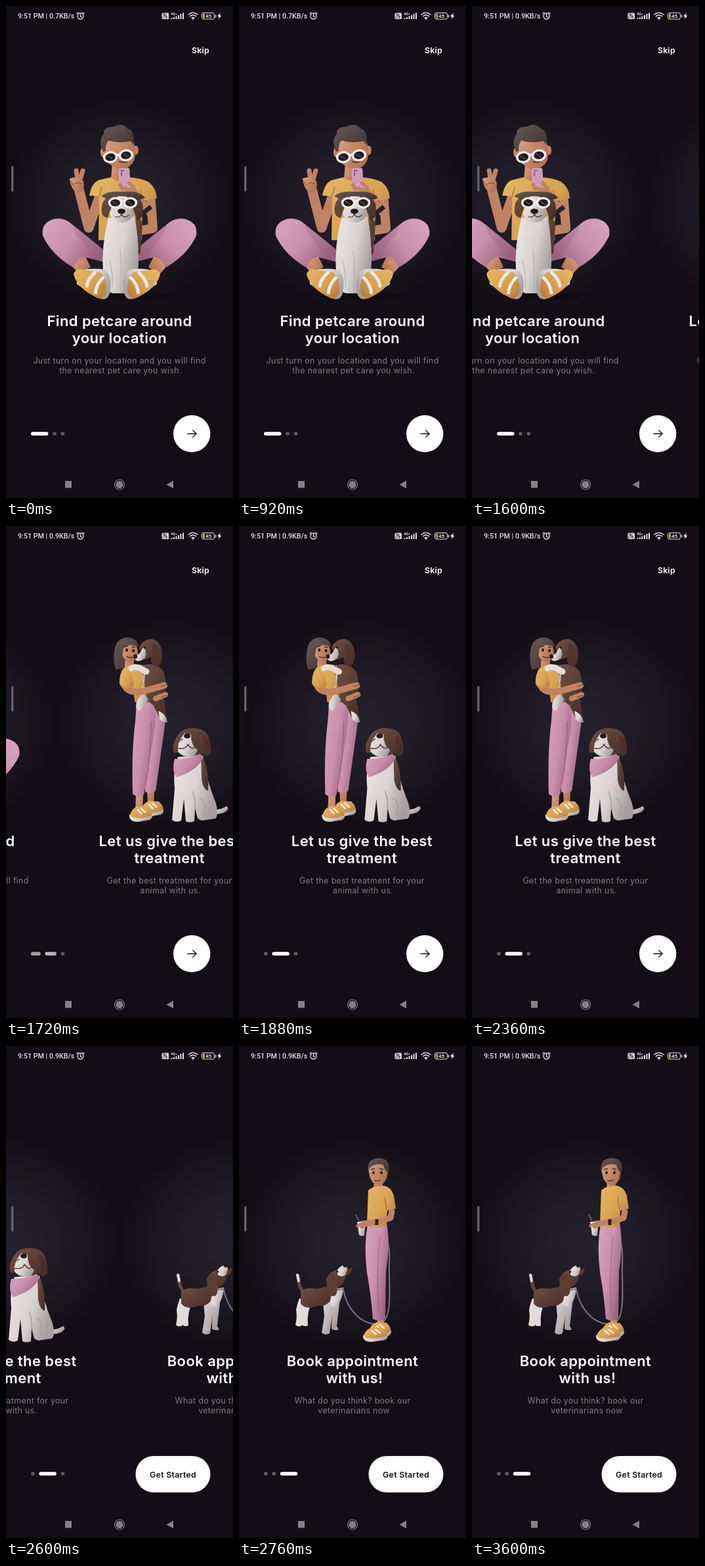
An HTML page for the animation above (4000 ms loop, 346 px wide and 750 px high).

```html
<!DOCTYPE html>
<html lang="en">
<head>
<meta charset="utf-8">
<title>Pet care onboarding</title>
<style>
html, body { margin: 0; width: 100%; height: 100%; overflow: hidden; background: #130e15; }
svg { display: block; width: 346px; height: 750px; }
text { font-family: Inter, sans-serif; fill: #fff; }
.title { font-size: 22px; font-weight: 600; letter-spacing: .42px; text-anchor: middle; }
.sub { font-size: 12.5px; letter-spacing: .28px; text-anchor: middle; fill: #7f7b82; }
.label { font-size: 12.4px; font-weight: 600; letter-spacing: .25px; }
.status { font: 500 10.7px Roboto, sans-serif; fill: #e4e2e5; }
.sk { fill: url(#skin); } .pk { fill: url(#pink); } .ye { fill: url(#yellow); }
.wh { fill: url(#white); } .br { fill: url(#brown); } .hair { fill: url(#hair); }
.bk { fill: #211b20; }
.arm { fill: none; stroke: #c08264; stroke-linecap: round; stroke-linejoin: round; }
.line { fill: none; stroke: #4b3430; stroke-linecap: round; }
.ink { fill: none; stroke: #e4e2e5; }
.nav { fill: #858188; }
</style>
</head>
<body>
<svg viewBox="0 0 346 750">
<defs>
  <radialGradient id="glow">
    <stop offset="0" stop-color="#25212d"/><stop offset=".5" stop-color="#1f1b26"/>
    <stop offset="1" stop-color="#130e15"/>
  </radialGradient>
  <linearGradient id="skin" x2="1" y2=".6"><stop stop-color="#dba284"/><stop offset="1" stop-color="#b2704f"/></linearGradient>
  <linearGradient id="pink" x2="1" y2=".6"><stop stop-color="#d9a5bf"/><stop offset=".55" stop-color="#c98fac"/><stop offset="1" stop-color="#9c6381"/></linearGradient>
  <linearGradient id="yellow" x2="1" y2=".8"><stop stop-color="#e6b765"/><stop offset=".6" stop-color="#d8a252"/><stop offset="1" stop-color="#b7803c"/></linearGradient>
  <linearGradient id="white" x2="1" y2=".5"><stop stop-color="#ece8e6"/><stop offset=".6" stop-color="#d8d2d1"/><stop offset="1" stop-color="#a79fa1"/></linearGradient>
  <linearGradient id="brown" x2="1" y2="1"><stop stop-color="#735143"/><stop offset="1" stop-color="#432d27"/></linearGradient>
  <linearGradient id="hair" x2="1" y2="1"><stop stop-color="#6a5a55"/><stop offset="1" stop-color="#3b3030"/></linearGradient>
  <ellipse id="light" cx="173" cy="300" rx="172" ry="160" fill="url(#glow)"/>
  <g id="leg">
    <path class="pk" d="M56 350Q53 331 72 325Q88 321 101 333L148 371V390L121 383Q107 389 103 399Q69 379 56 350Z"/>
    <path d="M106 349Q120 360 127 381L148 390V371L101 333Z" fill="#8a5573" opacity=".25"/>
    <path class="sk" d="M103 399Q107 385 121 382L129 398L112 409Z"/>
  </g>
  <g id="sandal">
    <path class="wh" d="M108 405Q130 398 150 402Q163 410 158 438Q154 450 143 446L108 424Z"/>
    <path class="ye" d="M103 409Q106 399 118 402L143 406Q155 415 153 436Q149 449 139 445Q108 430 103 409Z"/>
    <path d="M123 429Q123 417 137 405M136 439Q137 424 149 413" fill="none" stroke="#ebe6e2" stroke-width="5"/>
  </g>
  <g id="shades">
    <path d="M-23-2L23-2" stroke="#e9e5e4" stroke-width="4"/>
    <g fill="#211b20" stroke="#f0edeb" stroke-width="3.4"><ellipse cx="-12" rx="9.5" ry="7.5"/><ellipse cx="12" rx="9.5" ry="7.5"/></g>
    <path d="M-17-3L-9 3M7-3L15 3" stroke="#5b5158" stroke-width="1.4"/>
  </g>
  <g id="shoe">
    <path class="wh" d="M0 13Q-1 24 13 24L31 21Q37 17 34 11Z"/>
    <path class="ye" d="M1 13Q4 3 13 0L28 1Q36 9 34 14Q18 20 10 18Q3 18 1 13Z"/>
    <path d="M12 5L19 12M17 3L25 10" stroke="#f3ece0" stroke-width="2.5"/>
  </g>
</defs>

<g class="page">
  <use href="#light"/>
  <ellipse cx="186" cy="442" rx="62" ry="6" fill="#0b080d" opacity=".6"/>
  <use href="#leg"/><use href="#leg" transform="matrix(-1 0 0 1 346 0)"/>
  <path class="arm" stroke-width="15" d="M111 279L126 338L142 292"/>
  <path class="arm" stroke-width="14" d="M220 286L224 339L206 342"/>
  <path class="sk" d="M162 240H183V264Q172 275 160 264Z"/>
  <path class="ye" d="M160 261Q172 272 184 261Q205 262 217 268Q229 277 230 293L208 298L207 357H141L142 290L127 289Q131 268 143 265Z"/>
  <path d="M142 290L146 276M207 298L205 280" stroke="#a87330" stroke-width="1.4"/>
  <path class="arm" stroke-width="7" d="M110 270L107 251M112 268L117 251"/>
  <path class="sk" d="M97 263Q108 258 118 267Q121 282 110 285Q99 281 97 263Z"/>
  <path class="line" d="M104 272Q109 267 115 271M99 267L103 275" stroke-width=".8"/>
  <ellipse class="sk" cx="149" cy="223" rx="5" ry="8"/><ellipse class="sk" cx="198" cy="220" rx="4" ry="7"/>
  <path class="sk" d="M151 209Q153 197 174 199L193 203Q199 217 196 234Q190 248 175 249Q156 246 151 227Z"/>
  <path class="hair" d="M148 222Q140 205 149 195Q148 184 164 184Q176 177 186 187Q197 190 194 212L190 206Q172 210 156 205Q151 212 152 221Z"/>
  <path class="line" d="M173 237Q182 241 187 234" stroke-width="1.7"/>
  <use href="#shades" transform="translate(171 229) rotate(-7)"/>
  <path class="arm" stroke-width="11" d="M222 319L190 277"/>
  <path d="M211 314L221 306" stroke="#292228" stroke-width="7"/>
  <rect x="172" y="247" width="17" height="33" rx="3" fill="#cf9cb8" transform="rotate(-3 180 262)"/>
  <path d="M175 251H180M176 253V259" stroke="#8b5c7a" stroke-width="2"/>
  <path class="arm" stroke-width="6" d="M188 270L195 277M182 278L191 282M174 273L177 279"/>
  <path class="br" d="M198 318L208 330L205 376L193 390Z"/>
  <path class="wh" d="M156 323Q145 365 148 409Q148 434 163 438H187Q201 430 202 388Q202 350 196 321Z"/>
  <path d="M174 371Q177 405 175 434M158 388Q164 413 162 429" fill="none" stroke="#a9a1a3" stroke-width="1.3" opacity=".65"/>
  <path class="br" d="M147 301Q142 321 155 323L163 299L190 298L200 327Q212 324 208 301Q199 283 176 286Q154 284 147 301Z"/>
  <path class="wh" d="M170 290H184L195 315Q192 329 177 330Q160 329 158 315Z"/>
  <path class="hair" d="M145 290Q155 281 176 283Q203 281 212 292Q204 298 193 293Q174 286 154 294Z"/>
  <use href="#shades" transform="translate(178 300) scale(.95)"/>
  <ellipse class="bk" cx="176" cy="313" rx="6" ry="4"/>
  <path class="line" d="M167 321Q174 324 176 317Q179 325 187 319" stroke-width="1.3"/>
  <use href="#sandal"/><use href="#sandal" transform="matrix(-1 0 0 1 338 0)"/>
  <text class="title" x="173" y="488">Find petcare around</text>
  <text class="title" x="173" y="514">your location</text>
  <text class="sub" x="173" y="545">Just turn on your location and you will find</text>
  <text class="sub" x="174.500" y="560">the nearest pet care you wish.</text>
</g>

<g class="page">
  <use href="#light"/>
  <path class="hair" d="M91 219Q86 203 90 185Q94 170 110 170Q123 171 126 183L107 188L103 217Z"/>
  <path class="sk" d="M106 198H119V218H104Z"/>
  <path class="sk" d="M99 188Q102 177 115 178Q125 181 125 194Q122 207 112 208Q101 204 99 188Z"/>
  <path class="hair" d="M98 192Q96 174 109 173Q122 172 125 184Q110 178 103 187L101 199Z"/>
  <path d="M104 184L110 183M116 184L121 185" stroke="#3d2926" stroke-width="1.7"/>
  <ellipse class="bk" cx="108" cy="189" rx="2" ry="2.5"/><ellipse class="bk" cx="118" cy="190" rx="2" ry="2.5"/>
  <path class="line" d="M108 199Q112 202 116 200" stroke-width="1.5"/>
  <path class="sk" d="M139 403H150L149 429H140ZM122 406H133L132 436H121Z"/>
  <use href="#shoe" x="129" y="419"/>
  <use href="#shoe" x="112" y="427"/>
  <path class="pk" d="M136 266L164 268Q169 280 166 304L152 404Q144 410 136 405L137 340Z"/>
  <path class="pk" d="M123 267L151 268Q154 292 146 338L134 410Q125 415 117 409Q115 344 121 297Z"/>
  <path d="M145 298Q145 350 137 393" fill="none" stroke="#8d5874" stroke-width="1.4" opacity=".7"/>
  <path class="ye" d="M102 218Q113 207 136 213L143 268Q132 273 120 268L118 248Q104 252 97 241Q96 228 102 218Z"/>
  <path class="br" d="M131 213Q155 205 165 224Q171 244 164 259L169 294Q164 300 157 291L149 274L139 266Z"/>
  <path class="wh" d="M134 211Q139 237 129 250L141 264L128 282Q120 280 123 268L133 252Z"/>
  <path class="wh" d="M156 282Q167 285 170 299Q163 301 158 294Z"/>
  <path class="br" d="M127 185Q131 174 145 172Q160 174 162 194Q163 212 153 214Q144 211 145 200L135 204Z"/>
  <path d="M147 180Q160 184 160 207Q152 214 147 205Z" fill="#503329"/>
  <path class="wh" d="M133 185Q140 191 136 201Q127 209 121 204Q119 198 128 194Z"/>
  <ellipse class="bk" cx="121" cy="199" rx="3" ry="3.5"/><circle class="bk" cx="135" cy="185" r="1.8"/>
  <path d="M115 217Q121 213 128 217L138 222" fill="none" stroke="#e2dddb" stroke-width="9" stroke-linecap="round"/>
  <path class="arm" stroke-width="8" d="M152 263L167 257"/>
  <path class="arm" stroke-width="10" d="M105 244Q112 256 133 252L165 243"/>
  <path class="line" d="M160 245L171 241M160 261L170 258" stroke-width=".8"/>
  <path class="ye" d="M101 221Q112 218 116 228L119 244Q108 254 97 240Z"/>

  <path class="wh" d="M225 424Q241 439 260 427Q266 431 256 437Q240 443 225 434Z"/>
  <path class="wh" d="M186 352L224 350Q230 390 243 420Q249 440 243 446L222 449L216 446L212 430L211 450Q204 453 198 450L195 416L191 449Q184 453 177 448L181 400Q178 372 186 352Z"/>
  <path class="br" d="M221 348Q234 368 232 404Q224 401 222 386Z"/>
  <path d="M219 414Q232 421 225 442M208 404Q213 416 212 431" fill="none" stroke="#9b9394" stroke-width="1.2"/>
  <path class="br" d="M182 326Q189 308 208 308Q234 307 235 334Q239 350 229 351L220 346Q200 356 190 345L180 346Q176 336 182 326Z"/>
  <path class="wh" d="M196 316L206 318Q205 333 216 342L211 351Q194 354 186 344Q184 331 196 316Z"/>
  <path d="M224 319Q238 324 236 347Q231 352 226 344Z" fill="#49302a"/>
  <ellipse class="bk" cx="200" cy="320" rx="5" ry="3.8"/>
  <path class="line" d="M190 327L193 325M211 327L216 331M187 339Q198 341 201 333Q207 342 212 337" stroke-width="1.4"/>
  <path class="pk" d="M181 355Q199 356 220 347L224 354Q215 373 184 383Q176 374 181 355Z"/>
  <text class="title" x="173" y="488">Let us give the best</text>
  <text class="title" x="173" y="514">treatment</text>
  <text class="sub" x="173" y="545">Get the best treatment for your</text>
  <text class="sub" x="174.500" y="560">animal with us.</text>
</g>

<g class="page">
  <use href="#light"/>
  <path d="M159 372C165 401 185 425 213 424C236 421 228 360 229 335Q231 306 223 286" fill="none" stroke="#77747c" stroke-width="2"/>
  <path class="sk" d="M211 411H222L219 438H211Z"/>
  <use href="#shoe" x="197" y="421"/>
  <use href="#shoe" transform="translate(189 429) scale(1.08 .92)"/>
  <path class="pk" d="M196 272L225 270Q231 302 224 343L223 415Q214 422 204 416Q202 385 195 345Q190 304 196 272Z"/>
  <path d="M215 291Q208 350 213 407" fill="none" stroke="#8d5874" stroke-width="2" opacity=".4"/>
  <path class="sk" d="M206 202H219V222H205Z"/>
  <path class="hair" d="M197 190Q194 173 211 171Q229 170 229 187L226 205L200 204Z"/>
  <path class="sk" d="M198 188Q201 179 212 179Q226 179 226 193Q224 212 212 213Q199 209 198 188Z"/>
  <path class="hair" d="M197 192Q195 174 210 172Q228 171 228 194Q222 190 220 181Q207 178 199 186Z"/>
  <path d="M201 188L207 187M214 187L220 188" stroke="#3f2c29" stroke-width="1.6"/>
  <ellipse class="bk" cx="205" cy="193" rx="2" ry="2.5"/><ellipse class="bk" cx="217" cy="193" rx="2" ry="2.5"/>
  <path class="line" d="M207 205Q211 207 215 204" stroke-width="1.5"/>
  <path class="ye" d="M197 220Q204 213 221 213Q232 215 236 228L239 248L226 251L225 274Q210 280 195 273Z"/>
  <path d="M225 250L222 230" stroke="#a87432" stroke-width="1.4"/>
  <path class="arm" stroke-width="9" d="M233 252L231 262Q215 269 187 271"/>
  <path d="M210 264V273" stroke="#292228" stroke-width="5"/>
  <path d="M183 267L178 257" stroke="#625d66" stroke-width="2"/>
  <path class="wh" d="M180 268H193L191 289Q187 291 183 288Z"/>
  <path class="arm" stroke-width="5" d="M181 274L192 269M187 276L198 271"/>

  <path d="M98 376Q90 365 90 350" fill="none" stroke="#684538" stroke-width="5" stroke-linecap="round"/>
  <path d="M91 358L89 349" stroke="#e2dddb" stroke-width="4" stroke-linecap="round"/>
  <path class="wh" d="M100 388L112 390Q103 404 105 426Q100 429 96 425L99 405ZM142 392L154 384L149 427L152 432Q146 435 141 431Z"/>
  <path class="wh" d="M92 385Q108 382 110 396Q98 406 97 425Q91 430 86 425Q89 414 87 402Q89 392 92 385ZM128 390Q142 380 158 370Q158 390 143 403L138 438Q132 442 126 437L130 412Z"/>
  <path class="br" d="M94 375Q100 367 119 370L143 365L139 389Q131 398 120 396Q103 403 94 393Z"/>
  <path class="wh" d="M144 371L159 368Q159 386 146 399L138 393Z"/>
  <path class="br" d="M133 355Q139 342 151 341L163 339Q166 354 156 365Q145 374 134 365Z"/>
  <path class="wh" d="M150 341Q156 333 164 334L166 344Q160 355 150 349Z"/>
  <path d="M165 341L172 338Q171 350 162 350Z" fill="#663129"/>
  <ellipse class="bk" cx="162" cy="335" rx="3.2" ry="2.5"/><circle class="bk" cx="150" cy="344" r="1.5"/>
  <path d="M136 350Q145 344 147 354Q153 375 146 381Q133 383 133 367Z" fill="#5e3c30"/>
  <path d="M149 372L160 370" stroke="#77747c" stroke-width="2"/>
  <text class="title" x="173" y="488">Book appointment</text>
  <text class="title" x="176" y="514">with us!</text>
  <text class="sub" x="173" y="545">What do you think? book our</text>
  <text class="sub" x="175" y="560">veterinarians now</text>
</g>

<rect class="dot" y="649.2" height="5.6" rx="2.8"/><rect class="dot" y="649.2" height="5.6" rx="2.8"/><rect class="dot" y="649.2" height="5.6" rx="2.8"/>
<g id="next">
  <text class="label" x="283" y="72">Skip</text>
  <circle cx="283.200" cy="652" r="28.200" fill="#fff"/>
  <path d="M276.500 652H290M284.500 646.500L290 652L284.500 657.500" fill="none" stroke="#161118" stroke-width="1.4"/>
</g>
<g id="start">
  <rect x="197.500" y="625" width="114" height="55.500" rx="27.700" fill="#fff"/>
  <text class="label" x="254.500" y="657.500" text-anchor="middle" style="fill:#161118">Get Started</text>
</g>

<rect x="8" y="244" width="3.400" height="39" rx="1.700" fill="#656168"/>
<text class="status" id="clock" x="18" y="19"></text>
<g class="ink" stroke-width="1.4">
  <circle cx="113.500" cy="15.500" r="4.500"/><path d="M113.500 12.500V16L116 17M107.500 12L110.500 9.500M116.500 9.500L119.500 12"/>
  <rect x="298.500" y="10.500" width="19" height="9.500" rx="2.500" stroke-width="1"/><path d="M319.500 13.500V17.500"/>
  <path d="M277.500 13.500Q285 7 292.500 13.500M280 16Q285 11.500 290 16M282.500 18.500Q285 16 287.500 18.500" stroke-width="1.600"/>
  <path d="M252.500 20V18M256 20V17M259.500 20V15.500M263 20V14M266.500 20V12M270 20V10.500" stroke-width="2"/>
</g>
<circle cx="285" cy="19.500" r="1.300" fill="#e4e2e5"/>
<rect x="237.500" y="10.500" width="10.500" height="9.500" rx="1.500" fill="#e4e2e5"/>
<g style="font-size:4.500px;font-weight:700">
  <text x="239" y="15" style="fill:#130e15">Vo</text><text x="238.500" y="19" style="fill:#130e15">LTE</text>
  <text x="251.500" y="13.500">4G+</text>
</g>
<rect x="300" y="12" width="3" height="6.500" fill="#c6a34d"/>
<text x="308.500" y="18.200" text-anchor="middle" style="font:500 8px Roboto,sans-serif">45</text>
<path d="M327 10L322 16H325L323.500 20.500L328.500 14.500H325.500Z" fill="#fff"/>
<g class="nav">
  <rect x="90" y="724" width="10" height="10.500"/><path d="M244.500 729.500L255 723.500V735.500Z"/>
  <circle cx="173" cy="729.500" r="5.500"/><circle cx="173" cy="729.500" r="7.500" fill="none" stroke="#858188" stroke-width="1.200"/>
</g>
</svg>
<script>
const LOOP = 4000, STEP = 40;
const pages = document.querySelectorAll('.page');
const dots = document.querySelectorAll('.dot');
const [next, start, clock] = ['next', 'start', 'clock'].map(id => document.getElementById(id));
const clamp = x => Math.max(0, Math.min(1, x));
const mix = (a, b, k) => a + (b - a) * k;

// Each swipe is a short drag followed by a decaying settle.
function scroll(t) {
  if (t < 1560) return 0;
  if (t < 1600) return .234 * (t - 1560) / 40;
  if (t < 2160) return 1 - .22 * Math.exp(-.0104 * (t - 1720));
  if (t < 2440) return 1;
  if (t < 2600) return 1 + .5 * ((t - 2440) / 160) ** 2;
  if (t < 2760) return 2 - .5 * Math.exp(-.023 * (t - 2600));
  return 2;
}

function draw(t) {
  const pos = scroll(t);
  pages.forEach((page, i) => page.setAttribute('transform', `translate(${(i - pos) * 346} 0)`));
  const active = clamp((t - 1635) / 150) + clamp((t - 2600) / 150);
  let x = 38;
  dots.forEach((dot, i) => {
    const k = clamp(1 - Math.abs(i - active)), w = mix(5.8, 26.5, k);
    dot.setAttribute('x', x);
    dot.setAttribute('width', w);
    dot.setAttribute('fill', `rgb(${mix(92, 255, k)},${mix(88, 255, k)},${mix(95, 255, k)})`);
    x += w + 6.6;
  });
  const last = t >= 2600;
  next.style.display = last ? 'none' : '';
  start.style.display = last ? '' : 'none';
  clock.textContent = `9:51 PM | 0.${t < 1600 ? 7 : 9}KB/s`;
}

const begin = performance.now();
function tick() {
  const t = (performance.now() - begin) % LOOP;
  draw(Math.floor(t / STEP) * STEP);
  requestAnimationFrame(tick);
}
tick();
</script>
</body>
</html>
```
